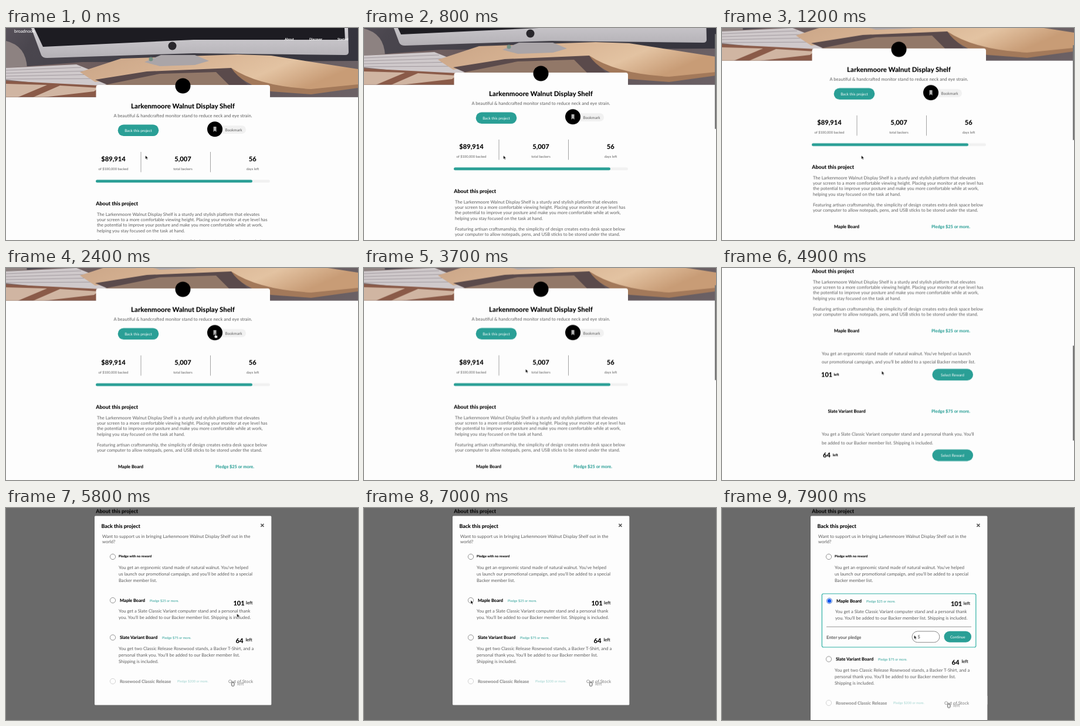
An HTML page for the animation above (8 s loop, 600 by 361 pixels).

```html
<!DOCTYPE html>
<html lang="en">
<head>
<meta charset="utf-8">
<title>Project page</title>
<style>
  html, body { margin: 0; width: 100%; height: 100%; overflow: hidden; background: #fdfdfd; }
  svg { display: block; }
  text { font: 7.62px Lato, "Open Sans", sans-serif; fill: #5c5c5c; text-rendering: geometricPrecision; white-space: pre; }
  .b { font-weight: 800; fill: #000; }
  .mid { text-anchor: middle; }
  .h1 { font-size: 11.45px; }
  .h2 { font-size: 8.9px; }
  .h3 { font-size: 7.5px; }
  .nav { font-size: 5.7px; font-weight: 700; fill: #fff; }
  .num { font-size: 11.2px; }
  .tiny { font-size: 5.8px; }
  .left { font-size: 6px; }
  .small { font-size: 5.6px; }
  .bt { font-size: 6.4px; fill: #fff; text-anchor: middle; }
  .teal { fill: #2a9f96; }
  .ring { fill: #fff; stroke: #767676; stroke-width: .8; }

  .scroll, .thumb, .thumb rect, .cursor, .cursor g, .modal, .picked, .first, .rest, .count {
    animation: 8s linear infinite;
  }
  .scroll { animation-name: scroll; }
  .thumb { animation-name: thumb; }
  .thumb rect { animation-name: showThumb; animation-timing-function: step-end; }
  .cursor { animation-name: move; }
  .cursor g, .modal, .picked, .first, .rest, .count { animation-timing-function: step-end; }
  .cursor .arrow { animation-name: arrow; }
  .cursor .hand { animation-name: hand; }
  .cursor .beam { animation-name: beam; }
  .modal { animation-name: open; }
  .picked { animation-name: pick; }
  .first { animation-name: nudge; }
  .count { animation-name: nudgeCount; }
  .rest { animation-name: push; }

  @keyframes scroll {
    0%, 7.5% { transform: translateY(0); }
    8.75% { transform: translateY(-6px); }
    10% { transform: translateY(-20.8px); }
    11.25% { transform: translateY(-48px); }
    12.5% { transform: translateY(-60px); }
    13.75%, 46.25% { transform: translateY(-62.2px); }
    48.75% { transform: translateY(-100px); }
    52.5% { transform: translateY(-187.8px); }
    56.25% { transform: translateY(-262px); }
    60%, 100% { transform: translateY(-293.5px); }
  }
  @keyframes thumb {
    0%, 7.5% { transform: translateY(1px); }
    10% { transform: translateY(10px); }
    13.75%, 46.25% { transform: translateY(29px); }
    52.5% { transform: translateY(85px); }
    60%, 100% { transform: translateY(132px); }
  }
  @keyframes showThumb {
    0%, 22.5%, 70% { opacity: 0; }
    7.5%, 46.25% { opacity: 1; }
  }
  @keyframes move {
    0%, 16.25% { transform: translate(237.6px, 217px); animation-timing-function: ease-in-out; }
    25%, 35% { transform: translate(356px, 111.5px); animation-timing-function: ease-in-out; }
    42.5%, 56.25% { transform: translate(275.5px, 172px); }
    60%, 62.5% { transform: translate(272.3px, 175.3px); animation-timing-function: ease-in-out; }
    67.5%, 75% { transform: translate(393.6px, 179.8px); }
    78.75% { transform: translate(336px, 200px); }
    87.5%, 92.5% { transform: translate(182px, 157px); animation-timing-function: ease-in-out; }
    97.5%, 100% { transform: translate(327.4px, 216.6px); }
  }
  @keyframes arrow {
    0%, 36.25%, 56.25%, 70% { opacity: 1; }
    23.75%, 51.25%, 66.5% { opacity: 0; }
  }
  @keyframes hand {
    0%, 36.25%, 70% { opacity: 0; }
    23.75%, 66.5% { opacity: 1; }
  }
  @keyframes beam {
    0%, 56.25% { opacity: 0; }
    51.25% { opacity: 1; }
  }
  @keyframes open { 0% { opacity: 0; } 70%, 100% { opacity: 1; } }
  @keyframes pick { 0% { opacity: 0; } 92.5%, 100% { opacity: 1; } }
  @keyframes nudge { 0% { transform: none; } 92.5%, 100% { transform: translate(1px, 1px); } }
  @keyframes nudgeCount { 0% { transform: none; } 92.5%, 100% { transform: translate(1.5px, 0); } }
  @keyframes push { 0% { transform: none; } 92.5%, 100% { transform: translateY(36.8px); } }
</style>
</head>
<body>
<svg width="600" height="361">
  <defs>
    <linearGradient id="wall" x2="1" y2=".15">
      <stop offset="0" stop-color="#57515a"/><stop offset=".1" stop-color="#4a464e"/>
      <stop offset="1" stop-color="#35343d"/>
    </linearGradient>
    <linearGradient id="desk">
      <stop offset="0" stop-color="#7d6a68"/><stop offset=".5" stop-color="#5d5054"/><stop offset="1" stop-color="#6b6165"/>
    </linearGradient>
    <linearGradient id="wood" x2="1" y2=".3">
      <stop offset="0" stop-color="#c9a486"/><stop offset=".45" stop-color="#d8b494"/>
      <stop offset=".75" stop-color="#e3c3a2"/><stop offset="1" stop-color="#c89c76"/>
    </linearGradient>
    <linearGradient id="chin" x2="0" y2="1">
      <stop offset="0" stop-color="#d2d0d4"/><stop offset="1" stop-color="#b4b1b6"/>
    </linearGradient>
  </defs>

  <g class="scroll">
    <!-- desk scene -->
    <svg width="600" height="117.5">
      <rect width="600" height="118" fill="url(#wall)"/>
      <path d="M0 22Q34 30 36 68L0 74Z" fill="#8d8281"/>
      <path d="M0 68L130 58 600 56V118H0Z" fill="url(#desk)"/>
      <path d="M0 68L120 62 205 96 150 104 0 88Z" fill="#cfc9cb"/>
      <path d="M0 72L128 67M0 77L142 73M0 82L156 79M0 87L170 86" stroke="#a39ba0" stroke-width="1.2"/>
      <path d="M0 90L160 98 165 118H0Z" fill="#8a5a48"/>
      <path d="M0 95L70 97 20 118H0ZM92 98L158 102 150 108 64 118H46Z" fill="#d0b5a2"/>
      <path d="M126 75L196 52 395 45 452 47 600 70V98L540 106 470 102 405 84 380 74 250 80 152 92Z" fill="url(#wood)"/>
      <path d="M152 88L240 74 384 68 412 97 176 98Z" fill="#5a4a4b"/>
      <path d="M168 97L262 78 358 75 380 97Z" fill="#927868"/>
      <path d="M384 68Q430 99 520 104L600 96V102L520 113 452 108Q402 96 384 68Z" fill="#a3795a"/>
      <path d="M236 58L264 46H322L346 56 322 63 262 65Z" fill="#aaa5a8"/>
      <circle cx="247" cy="53" r="3.5" fill="#739184"/>
      <path d="M43 0H583L584 41Q584 46 578 46L320 43 70 51Q62 51 60 46Z" fill="url(#chin)"/>
      <path d="M48 0H577L578 20 320 20 63 32Z" fill="#1d1c22"/>
      <circle cx="283.5" cy="30.5" r="7" fill="#29272c"/>
    </svg>
    <text class="b" x="14" y="8.2" style="font-size:7.4px;fill:#fff;font-weight:500">broadnook</text>
    <text class="nav" x="475" y="21.2">About</text>
    <text class="nav" x="517" y="21.2">Discover</text>
    <text class="nav" x="565" y="21.2">Started</text>

    <!-- summary -->
    <rect x="153.5" y="97" width="296.5" height="30" rx="4" fill="#fdfdfd"/>
    <circle cx="301.5" cy="98.5" r="13" fill="#000"/>
    <text class="b h1 mid" x="301.5" y="137.3">Larkenmoore Walnut Display Shelf</text>
    <text class="mid" x="301.5" y="152.2">A beautiful &amp; handcrafted monitor stand to reduce neck and eye strain.</text>
    <rect class="teal" x="190.7" y="164.5" width="69.6" height="19.6" rx="9.8"/>
    <text class="bt" x="225.5" y="177">Back this project</text>
    <rect x="345" y="166.3" width="64" height="13.8" rx="6.9" fill="#f1f1f1"/>
    <circle cx="356" cy="172.3" r="13" fill="#000"/>
    <path d="M353.6 168H358.5V177L356 174.7 353.6 177Z" fill="#b3b3b3"/>
    <text x="373.5" y="175.8" style="font-size:6.5px">Bookmark</text>

    <text class="b num mid" x="183" y="227.3">$89,914</text>
    <text class="b num mid" x="301.5" y="227.3">5,007</text>
    <text class="b num mid" x="420.3" y="227.3">56</text>
    <text class="tiny mid" x="183" y="242">of $100,000 backed</text>
    <text class="tiny mid" x="301.5" y="242">total backers</text>
    <text class="tiny mid" x="420.5" y="242">days left</text>
    <path d="M230 211V245.5M348.5 211V245.5" stroke="#a2a2a2"/>
    <rect x="153" y="258.5" width="297" height="4.8" rx="2.4" fill="#f1f1f1"/>
    <rect class="teal" x="153" y="258.5" width="267" height="4.8" rx="2.4"/>

    <!-- about -->
    <text class="b h2" x="153.3" y="302.4">About this project</text>
    <text x="155" y="319.6">The Larkenmoore Walnut Display Shelf is a sturdy and stylish platform that elevates</text>
    <text x="155" y="328.9">your screen to a more comfortable viewing height. Placing your monitor at eye level has</text>
    <text x="155" y="338.2">the potential to improve your posture and make you more comfortable while at work,</text>
    <text x="155" y="347.5">helping you stay focused on the task at hand.</text>
    <text x="155" y="366">Featuring artisan craftsmanship, the simplicity of design creates extra desk space below</text>
    <text x="155" y="375.3">your computer to allow notepads, pens, and USB sticks to be stored under the stand.</text>

    <!-- rewards -->
    <text class="b h3 mid" x="212.5" y="402.9">Maple Board</text>
    <text class="b teal" x="357" y="402.9" style="font-size:7.35px">Pledge $25 or more.</text>
    <text x="170" y="441.7">You get an ergonomic stand made of natural walnut. You've helped us launch</text>
    <text x="170" y="456.4">our promotional campaign, and you'll be added to a special Backer member list.</text>
    <text class="b mid" x="178.6" y="479" style="font-size:11px">101</text>
    <text class="b left" x="190.6" y="476.6">left</text>
    <rect class="teal" x="358.4" y="465.3" width="69.6" height="19.6" rx="9.8"/>
    <text class="bt" x="393" y="477.6">Select Reward</text>

    <text class="b h3 mid" x="212.6" y="540.2">Slate Variant Board</text>
    <text class="b teal" x="357" y="540.2" style="font-size:7.35px">Pledge $75 or more.</text>
    <text x="170" y="578.9">You get a Slate Classic Variant computer stand and a personal thank you. You'll</text>
    <text x="170" y="593.7">be added to our Backer member list. Shipping is included.</text>
    <text class="b mid" x="178.4" y="616.3" style="font-size:11.2px">64</text>
    <text class="b left" x="188.8" y="614">left</text>
    <rect class="teal" x="358.4" y="602.6" width="69.6" height="19.6" rx="9.8"/>
    <text class="bt" x="393" y="614.9">Select Reward</text>
  </g>

  <g class="thumb"><rect x="598" width="2" height="162" rx="1" fill="#777"/></g>

  <!-- pledge dialog -->
  <g class="modal">
    <rect width="600" height="361" fill="#000" fill-opacity=".58"/>
    <rect x="151" y="13.5" width="301.3" height="322" rx="1.5" fill="#fdfdfd"/>
    <rect class="picked" x="151" y="320" width="301.3" height="60" fill="#fdfdfd"/>
    <text class="b h2" x="162.4" y="34.1">Back this project</text>
    <path d="M434.4 27L439.4 32M439.4 27L434.4 32" stroke="#555" stroke-width="1.7"/>
    <text x="164" y="51.2">Want to support us in bringing Larkenmoore Walnut Display Shelf out in the</text>
    <text x="164" y="60.4">world?</text>

    <circle class="ring" cx="182" cy="83" r="4.6"/>
    <text class="b small" x="192" y="84.3">Pledge with no reward</text>
    <text x="192" y="104.1">You get an ergonomic stand made of natural walnut. You've helped</text>
    <text x="192" y="115.3">us launch our promotional campaign, and you'll be added to a special</text>
    <text x="192" y="126.4">Backer member list.</text>

    <g class="picked">
      <rect x="170.4" y="146" width="262.4" height="91" rx="2.5" fill="none" stroke="#2fb0a4" stroke-width="1.2"/>
      <path d="M178 202.3H425" stroke="#8d8d8d" stroke-width=".9"/>
      <text class="b" x="178" y="222.6" style="font-weight:700;fill:#5c5c5c">Enter your pledge</text>
      <rect x="324" y="210" width="46.8" height="18.8" rx="9.4" fill="#fff" stroke="#7c7c7c" stroke-width=".9"/>
      <text x="333.5" y="222.4">$</text>
      <rect class="teal" x="378.5" y="209.8" width="46.5" height="19" rx="9.5"/>
      <text class="bt" x="401.8" y="221.7">Continue</text>
    </g>

    <g class="first">
      <circle class="ring" cx="182" cy="157.2" r="4.6"/>
      <g class="picked">
        <circle cx="182" cy="157.2" r="4.5" fill="#fff" stroke="#3d78e8" stroke-width=".8"/>
        <circle cx="182" cy="157.2" r="3.2" fill="#0b57f0"/>
      </g>
      <text class="b h3" x="194" y="160">Maple Board</text>
      <text class="small teal" x="245" y="159.5">Pledge $25 or more.</text>
      <g class="count">
        <text class="b mid" x="397" y="166" style="font-size:11px">101</text>
        <text class="b" x="409" y="163.6" style="fill:#333">left</text>
      </g>
      <text x="192" y="178">You get a Slate Classic Variant computer stand and a personal thank</text>
      <text x="192" y="189.2">you. You'll be added to our Backer member list. Shipping is included.</text>
    </g>

    <g class="rest">
      <circle class="ring" cx="182" cy="220.5" r="4.6"/>
      <text class="b h3" x="194" y="223.3">Slate Variant Board</text>
      <text class="small teal" x="266" y="222.8">Pledge $75 or more.</text>
      <text class="b mid" x="398" y="229.6" style="font-size:11.2px">64</text>
      <text class="b" x="408.4" y="227" style="fill:#333">left</text>
      <text x="192" y="241.7">You get two Classic Release Rosewood stands, a Backer T-Shirt, and a</text>
      <text x="192" y="252.8">personal thank you. You'll be added to our Backer member list.</text>
      <text x="192" y="263.9">Shipping is included.</text>

      <circle class="ring" cx="182" cy="295" r="4.6" opacity=".4"/>
      <g opacity=".45">
        <text class="b h3" x="194" y="297.7">Rosewood Classic Release</text>
        <text class="small teal" x="292" y="297.3">Pledge $200 or more.</text>
        <text class="b mid" x="386.7" y="304.2" style="font-size:11.2px">0</text>
        <text class="b" x="394" y="302" style="fill:#555">left</text>
      </g>
      <text x="379" y="298" opacity=".8">Out of Stock</text>
    </g>
  </g>

  <g class="cursor">
    <g class="arrow">
      <path d="M0 0V6.3L1.5 5 2.5 7.3 3.6 6.8 2.6 4.6H4.5Z" fill="#000" stroke="#fff" stroke-width=".5"/>
    </g>
    <g class="hand">
      <path d="M0 .6Q.7 -.4 1.4 .6V3.2L4 3.8Q4.8 4 4.7 5L4.2 7.8H.4L-1.9 4.8Q-1.6 3.9 0 5Z" fill="#fff" stroke="#000" stroke-width=".6"/>
    </g>
    <g class="beam">
      <path d="M-1.4 -3.5Q0 -3.5 0 -2.6 0 -3.5 1.4 -3.5M0 -2.6V2.6M-1.4 3.5Q0 3.5 0 2.6 0 3.5 1.4 3.5" fill="none" stroke="#333" stroke-width=".7"/>
    </g>
  </g>
</svg>
</body>
</html>
```
